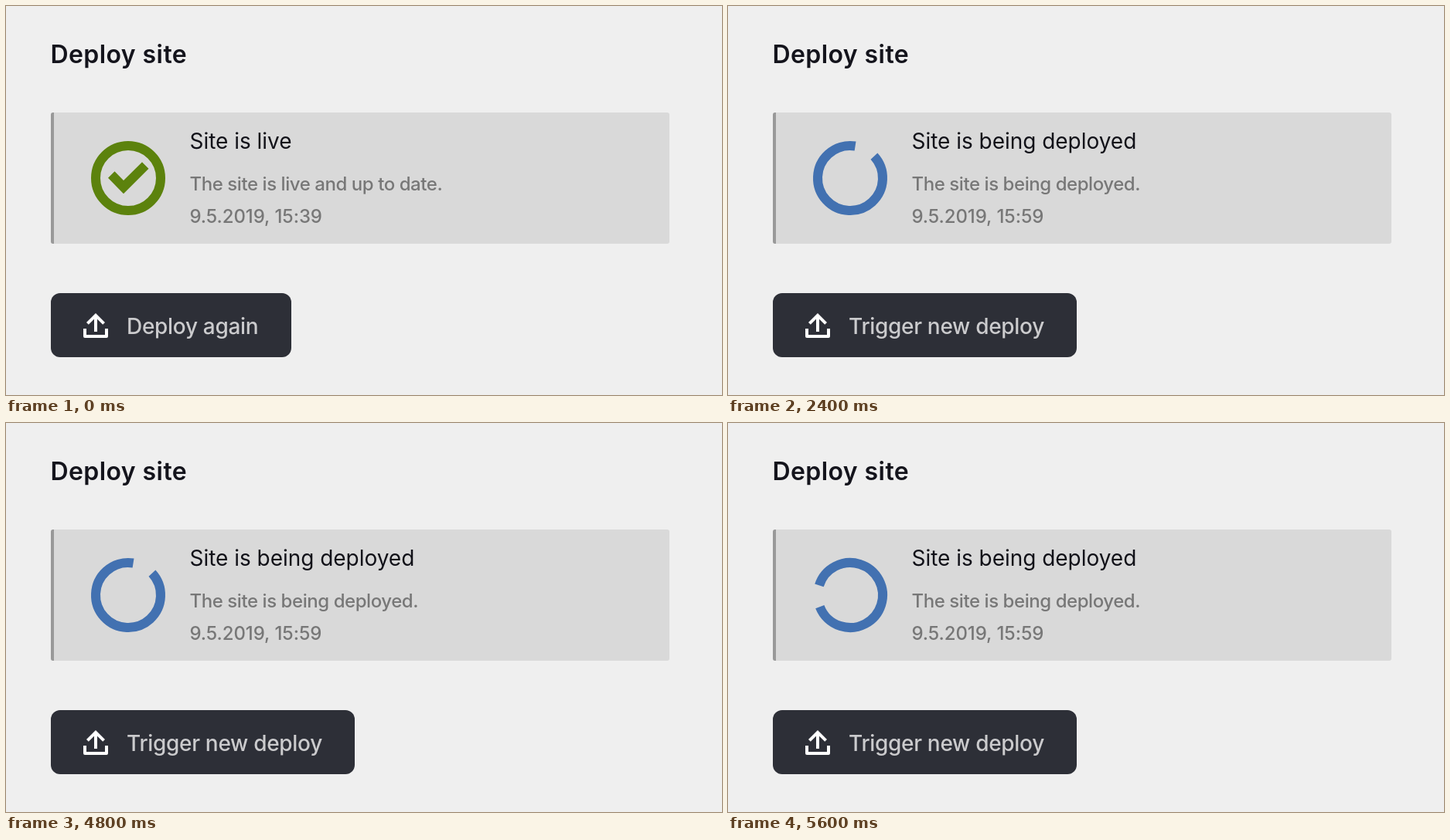
An HTML page with a canvas for the animation above (6 s loop, 926 by 504 pixels).

```html
<!DOCTYPE html>
<html lang="en">
<head>
<meta charset="utf-8">
<title>Deploy site</title>
<style>
  html, body { margin: 0; width: 100%; height: 100%; overflow: hidden; background: #efefef; }
  canvas { display: block; width: 926px; height: 504px; }
</style>
</head>
<body>
<canvas id="stage"></canvas>
<script>
const W = 926, H = 504, LOOP = 6000, SPIN_STEP = 400;
const CX = 158, CY = 223, RING = 42, STROKE = 12;
const FONT = 'Inter, "Noto Sans", sans-serif';

const canvas = document.getElementById('stage');
const ctx = canvas.getContext('2d');
const dpr = window.devicePixelRatio || 1;
canvas.width = W * dpr;
canvas.height = H * dpr;
ctx.scale(dpr, dpr);

const states = {
  live: {
    title: 'Site is live', info: 'The site is live and up to date.',
    date: '9.5.2019, 15:39', button: 'Deploy again', width: 311, icon: drawCheck
  },
  changed: {
    title: 'Undeployed changes', info: 'There where changes after the last deployment.',
    date: '9.5.2019, 15:56', button: 'Deploy now', width: 294, icon: drawWarning
  },
  busy: {
    title: 'Site is being deployed', info: 'The site is being deployed.',
    date: '9.5.2019, 15:59', button: 'Trigger new deploy', width: 393, icon: drawSpinner
  },
  error: {
    title: 'Error', info: 'There was an error while trying to deploy.',
    date: '9.5.2019, 16:01', button: 'Trigger new deploy', width: 393, icon: drawCross
  }
};

// Every state lasts one fifth of the loop.
const sequence = ['live', 'changed', 'busy', 'error', 'busy'];
const HOLD = LOOP / sequence.length;

function text(str, x, y, size, color, weight, spacing) {
  ctx.font = `${weight} ${size}px ${FONT}`;
  ctx.letterSpacing = spacing + 'px';
  ctx.fillStyle = color;
  ctx.fillText(str, x, y);
}

function box(x, y, w, h, radii, color) {
  ctx.fillStyle = color;
  ctx.beginPath();
  ctx.roundRect(x, y, w, h, radii);
  ctx.fill();
}

function stroke(path, color, width, join = 'miter') {
  ctx.strokeStyle = color;
  ctx.lineWidth = width;
  ctx.lineJoin = join;
  ctx.stroke(new Path2D(path));
}

function ring(color, from = 0, to = 2 * Math.PI) {
  ctx.strokeStyle = color;
  ctx.lineWidth = STROKE;
  ctx.beginPath();
  ctx.arc(CX, CY, RING, from, to);
  ctx.stroke();
}

function drawCheck() {
  const color = '#5c820d';
  ring(color);
  ctx.fillStyle = color;
  ctx.fill(new Path2D('M140.5 214.3L152 226L176 202.3L184.5 210.8L152 243.3L132 222.8Z'));
}

function drawWarning() {
  const color = '#f68b1f';
  stroke('M158 181L200 265H116Z', color, STROKE, 'round');
  box(152, 211, 12, 24, 0, color);
  box(152, 241, 12, 12, 6, color);
}

function drawCross() {
  const color = '#cb2a2b', d = 16.8;
  ring(color);
  stroke(`M${CX - d} ${CY - d}L${CX + d} ${CY + d}M${CX + d} ${CY - d}L${CX - d} ${CY + d}`, color, STROKE);
}

function drawSpinner(elapsed) {
  const rad = Math.PI / 180;
  const gapStart = 9 + 120 * Math.floor(elapsed / SPIN_STEP) - 90;
  ring('#4271b1', (gapStart + 38.5) * rad, (gapStart + 360) * rad);
}

function drawButton(label, width) {
  box(58, 372, width, 83, 12, '#2d2f37');
  stroke('M102 418V428H130V418', '#fff', 4, 'round');
  stroke('M105.4 411.4L116 400.8L126.6 411.4M116 401V422', '#fff', 4);
  text(label, 156, 425, 28, '#cbcbcd', 500, -0.3);
}

function draw(t) {
  const state = states[sequence[Math.floor(t / HOLD)]];
  box(0, 0, W, H, 0, '#efefef');
  text('Deploy site', 57.5, 74, 32, '#14141c', 600, 0.42);

  box(58, 138, 800, 170, 3, '#d9d9d9');
  box(58, 138, 4, 170, [3, 0, 0, 3], '#999');
  state.icon(t % HOLD);
  text(state.title, 237.5, 185, 28, '#111118', 400, -0.03);
  text(state.info, 237.5, 239, 24, '#777', 500, -0.44);
  text(state.date, 237.5, 281, 24, '#777', 500, -0.1);

  drawButton(state.button, state.width);
}

const start = performance.now();
function tick() {
  draw((performance.now() - start) % LOOP);
  requestAnimationFrame(tick);
}
tick();
</script>
</body>
</html>
```
